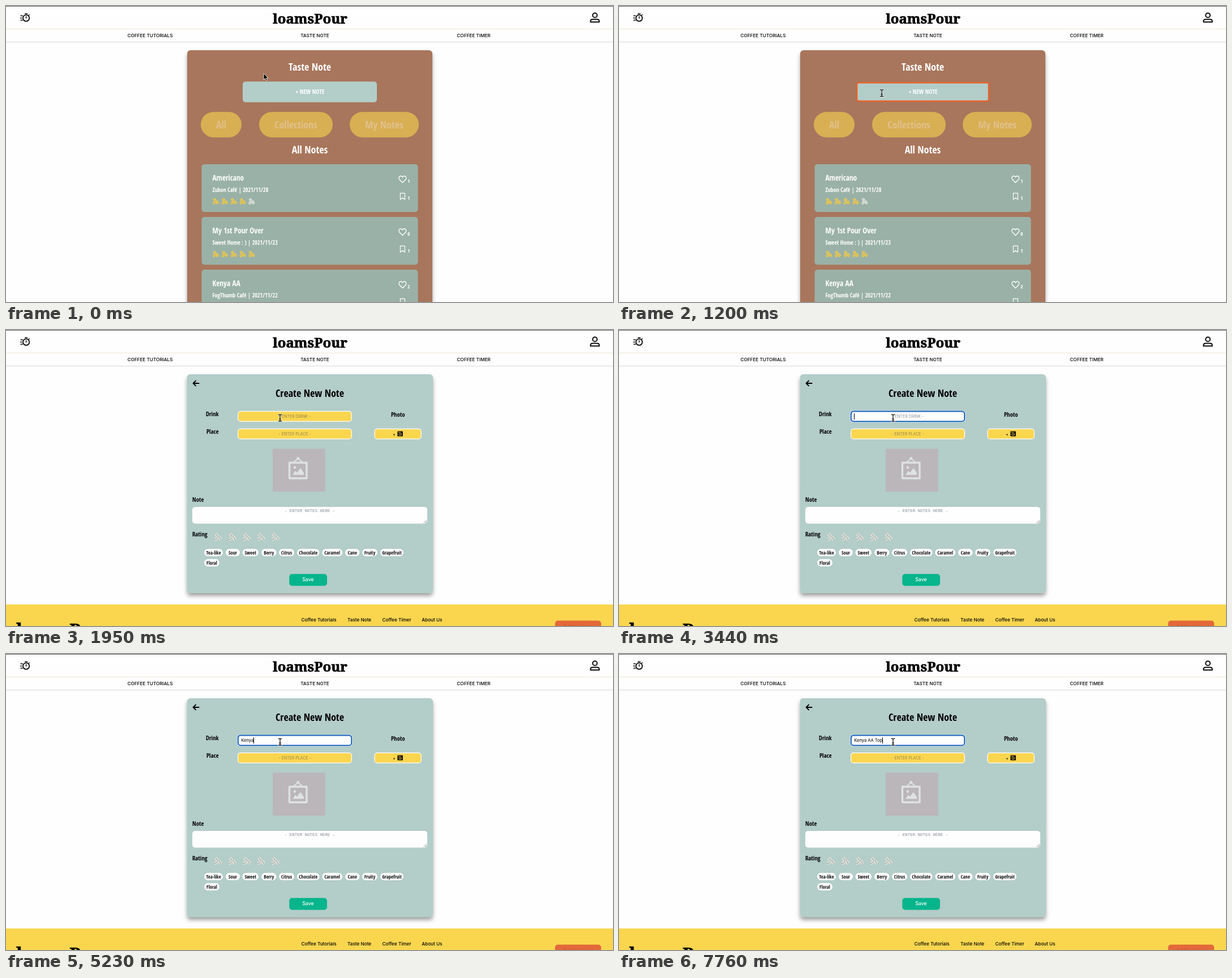
Write an HTML page that moves like this. It is 1072 px wide and 522 px high and loops after 8 s.

```html
<!DOCTYPE html>
<html lang="en">
<head>
<meta charset="utf-8">
<title>Taste notes</title>
<style>
  html, body { margin: 0; width: 100%; height: 100%; overflow: hidden; background: #fefefe; }
  svg { display: block; width: 100vw; height: 100vh; }
  text { font-family: Inter, "Open Sans", sans-serif; font-weight: 500; }
  .cond { font-family: "Open Sans Condensed", "Open Sans", sans-serif; font-stretch: 75%; font-weight: 700; }
  .light { font-weight: 300; }
  .logo { font-family: "Noto Serif", serif; font-weight: 700; stroke: #000; stroke-width: .7px; }
  .mono { font-family: "Liberation Mono", monospace; font-weight: 400; }
  .hint { font-size: 7px; font-weight: 400; }
  .mid { text-anchor: middle; }
  .line { fill: none; stroke-linecap: round; stroke-linejoin: round; }
</style>
</head>
<body>
<svg viewBox="0 0 1072 522" preserveAspectRatio="none">
  <defs>
    <filter id="shadow" x="-10%" y="-10%" width="120%" height="125%">
      <feDropShadow dx="0" dy="5" stdDeviation="3.5" flood-color="#000" flood-opacity=".36"/>
    </filter>
    <g id="beans">
      <ellipse cx="-1.8" cy="-2.6" rx="2.4" ry="3.3" transform="rotate(-38 -1.8 -2.6)"/>
      <ellipse cx="-2.9" cy="2.8" rx="2.2" ry="3" transform="rotate(55 -2.9 2.8)"/>
      <ellipse cx="2.6" cy="1.7" rx="2.5" ry="3.6" transform="rotate(-30 2.6 1.7)"/>
      <path class="line" d="M-3.6-4.8Q-1.4-3.4-.6-.6M-5.4 3.8Q-3.2 3.6-.8 1.6M.9-1Q3 1.4 4.2 4.4" stroke="#8b9a83" stroke-width=".8"/>
    </g>
    <path id="heart" class="line" stroke="#fff" stroke-width="1.4" d="M0 6L-5.4.6C-7.8-2-6-5.8-3.2-5.8Q-1-5.8 0-3.6Q1-5.8 3.2-5.8C6-5.8 7.8-2 5.4.6Z"/>
    <path id="bookmark" class="line" stroke="#fff" stroke-width="1.2" d="M-4-5.6H4V5.6L0 2.4L-4 5.6Z"/>
    <path id="beam" class="line" d="M-2.8-5.8Q0-5.8 0-4.4Q0-5.8 2.8-5.8M0-4.4V4.6M-1.6 2H1.6M-2.8 6Q0 6 0 4.6Q0 6 2.8 6"/>
  </defs>

  <rect width="1072" height="522" fill="#fefefe"/>
  <rect width="1072" height="1" fill="#626262"/>
  <rect y="40" width="1072" height="1" fill="#ece6cf"/>
  <rect y="63" width="1072" height="1" fill="#d9d9d3"/>
  <g class="line" stroke="#0b0b0b" stroke-width="1.8">
    <circle cx="35.6" cy="21.3" r="5.6"/>
    <path d="M33.6 13.6H37.6M35.6 18.5V21.5M40.2 16.2L41.2 15.2M26 17.3H29.2M25.6 21.2H27.8M26 25.1H29.2" stroke-width="1.5"/>
    <circle cx="1040" cy="16.4" r="3.9" stroke-width="2"/>
    <path d="M1032.3 28.3V27Q1032.3 23.6 1036.5 23.6H1043.5Q1047.7 23.6 1047.7 27V28.3Z" stroke-width="2"/>
  </g>
  <text class="logo mid" x="537" y="31" font-size="24">loamsPour</text>
  <g class="mid" font-size="8.2">
    <text x="254.5" y="55">COFFEE TUTORIALS</text>
    <text x="545.5" y="55">TASTE NOTE</text>
    <text x="826" y="55">COFFEE TIMER</text>
  </g>

  <g id="list">
    <rect x="320" y="78" width="433" height="480" rx="6" fill="#a8765b" filter="url(#shadow)"/>
    <g class="mid" font-size="18" fill="#fff">
      <text class="cond" x="536.5" y="114.3">Taste Note</text>
      <text class="cond" x="536.5" y="259.5">All Notes</text>
    </g>
    <rect id="newNote" fill="#b3cdc9" stroke="#e8622a"/>
    <text class="cond mid" x="537" y="154.8" font-size="10.5" fill="#fff">+ NEW NOTE</text>
    <g id="tabs"></g>
    <g id="notes"></g>
  </g>

  <g id="form">
    <rect x="319.5" y="78" width="434.5" height="386" rx="6" fill="#b3cdc9" filter="url(#shadow)"/>
    <path class="line" d="M340.5 94H331M335 89.6L330.6 94L335 98.4" stroke="#000" stroke-width="2"/>
    <text class="cond mid" x="536.5" y="118.3" font-size="18">Create New Note</text>
    <g font-size="10.7">
      <text class="cond" x="353" y="152">Drink</text>
      <text class="cond" x="354" y="183">Place</text>
      <text class="cond" x="680" y="152.5">Photo</text>
      <text class="cond" x="329" y="302.5">Note</text>
      <text class="cond" x="329" y="364">Rating</text>
    </g>
    <rect id="ring" x="408" y="142" width="204" height="21" rx="6" fill="#e8f0f2"/>
    <rect id="drinkBox" x="409.8" y="143.4" width="200.4" height="17.8" rx="4.5"/>
    <g fill="#fad64f" stroke="#fff" stroke-width="1.2">
      <rect x="409.6" y="174.4" width="200.8" height="17.8" rx="4.5"/>
      <rect x="651" y="174.4" width="82.2" height="17.8" rx="4.5"/>
    </g>
    <text id="drinkHint" class="hint mid" x="510" y="155">- ENTER DRINK -</text>
    <text class="hint mid" x="510" y="185.7" fill="#96844a">- ENTER PLACE -</text>
    <text id="drink" x="415.3" y="155" font-size="7.5" style="font-weight:400"></text>
    <rect id="caret" y="147" width="1" height="11"/>
    <text x="683" y="186.5" font-size="7">+</text>
    <rect x="691.3" y="178.6" width="9.6" height="8.8" rx="1.2" fill="#161206"/>
    <path d="M692.5 180.4H697" stroke="#fad64f" stroke-width=".7"/>
    <circle class="line" cx="696" cy="184" r="2" stroke="#fad64f" stroke-width=".8"/>

    <rect x="471" y="209.5" width="92.5" height="75.5" fill="#bab6b9"/>
    <g class="line" stroke="#dfe2e2">
      <rect x="500.5" y="234" width="30.5" height="27.5" stroke-width="3.4"/>
      <path d="M509 232L515.7 227L522.5 232" stroke-width="2"/>
    </g>
    <g fill="#dfe2e2">
      <circle cx="515.7" cy="226.3" r="2.5"/>
      <circle cx="510" cy="242.5" r="2.3"/>
      <path d="M506 255.5L511 248.5L514 251.5L520 243.5L526 252V255.5Z"/>
    </g>

    <rect x="329" y="312" width="415" height="29.5" rx="5" fill="#fefefe"/>
    <text class="mono mid" x="536.5" y="320.8" font-size="7.45" fill="#858b99">- ENTER NOTES HERE -</text>
    <path d="M737.5 340.5L743 335M740.5 340.5L743 338" stroke="#777" stroke-width=".8"/>
    <g id="rating" fill="#dcdfdb"></g>
    <g id="chips" font-size="8.6" fill="#111"></g>
    <rect x="500.3" y="430.2" width="66.7" height="21" rx="5" fill="#06b58c"/>
    <text class="mid" x="533.5" y="443.3" font-size="8.8" fill="#fff">Save</text>

    <rect y="484" width="1072" height="38" fill="#fad64f"/>
    <text class="logo" x="18" y="540" font-size="31">loamsPour</text>
    <g font-size="8.2">
      <text x="521.5" y="514">Coffee Tutorials</text>
      <text x="603" y="514">Taste Note</text>
      <text x="664.5" y="514">Coffee Timer</text>
      <text x="734.3" y="514">About Us</text>
    </g>
    <rect x="969.7" y="512.5" width="81.3" height="24" rx="5" fill="#e3683a"/>
    <text class="mid" x="1010.5" y="525.5" font-size="8.5" fill="#d4512a">Add to Home</text>
  </g>

  <g id="cursor">
    <path data-shape="arrow" d="M0 0V11L2.6 8.7L4.4 12.6L6.3 11.7L4.6 8H8Z" fill="#000" stroke="#fff" stroke-width=".8"/>
    <path data-shape="hand" d="M-2-5Q-1-6.2 0-5V-1L4-.2Q5.2.2 5 2L4 6.5H-2L-5 2Q-5 .4-3.6 1L-2 2.4Z" fill="#fff" stroke="#000" stroke-width=".9"/>
    <g data-shape="beam">
      <use href="#beam" stroke="#fff" stroke-opacity=".8" stroke-width="2.6"/>
      <use href="#beam" stroke="#000" stroke-width="1.2"/>
    </g>
  </g>
</svg>

<script>
const $ = id => document.getElementById(id);
const show = (el, on) => { el.style.display = on ? '' : 'none'; };
const setAttrs = (el, attrs) => Object.entries(attrs).forEach(([k, v]) => el.setAttribute(k, v));
const text = (cls, x, y, str, extra = '') => `<text class="${cls}" x="${x}" y="${y}" ${extra}>${str}</text>`;
const icon = (id, x, y, extra = '') => `<use href="#${id}" x="${x}" y="${y}" ${extra}/>`;
const five = draw => [0, 1, 2, 3, 4].map(draw).join('');

$('tabs').innerHTML = [['All', 344, 72], ['Collections', 447, 130], ['My Notes', 607, 122]]
  .map(([label, x, w]) =>
    `<rect x="${x}" y="186.7" width="${w}" height="45" rx="22.5" fill="#d8af53"/>` +
    text('cond mid', x + w / 2, 215.8, label, 'font-size="18" fill="#e0c08c"'))
  .join('');

$('notes').innerHTML = [
  ['Americano', 'Zubon Café | 2021/11/28', 4, 1, 1],
  ['My 1st Pour Over', 'Sweet Home : ) | 2021/11/23', 5, 0, 1],
  ['Kenya AA', 'FogThumb Café | 2021/11/22', 4, 2, 1],
].map(([name, info, stars, likes, saves], i) => {
  const y = 279 + i * 93;
  return `<g fill="#fff"><rect x="345.5" y="${y}" width="382" height="84.3" rx="5" fill="#9ab1a7"/>` +
    text('cond', 364.5, y + 28.8, name, 'font-size="13.3"') +
    text('cond', 364.5, y + 49, info, 'font-size="10"') +
    five(n => icon('beans', 370.5 + n * 15.8, y + 65.5, `fill="${n < stars ? '#f3cd4e' : '#e6e8e4'}"`)) +
    icon('heart', 700.3, y + 26.5) + icon('bookmark', 700.4, y + 56.8) +
    text('cond light', 709, y + 33, likes, 'font-size="9.5"') +
    text('cond light', 709, y + 63, saves, 'font-size="9.5"') + '</g>';
}).join('');

$('rating').innerHTML = five(n =>
  `<g transform="translate(${374.3 + n * 25.4} 365) scale(1.25)"><use href="#beans"/></g>`);

$('chips').innerHTML = [
  ['Tea-like', 350, 33], ['Sour', 388, 25], ['Sweet', 417.5, 28.5], ['Berry', 451, 26.5],
  ['Citrus', 482, 27], ['Chocolate', 514, 39.5], ['Caramel', 558.3, 35.7], ['Cane', 599, 25.5],
  ['Fruity', 629, 27], ['Grapefruit', 661, 41], ['Floral', 350, 27, 18],
].map(([label, x, w, dy = 0]) =>
  `<rect x="${x}" y="${386 + dy}" width="${w}" height="13" rx="6.5" fill="#fefefe"/>` +
  text('cond light mid', x + w / 2, 395.6 + dy, label)).join('');

const LOOP = 8000, FORM_AT = 1350, FOCUS_AT = 2390;
const DRINK = 'Kenya\u00a0AA\u00a0Top';
const keyTimes = [3590, 3890, 4180, 4930, 5230, 5680, 5980, 6270, 6870, 7160, 7460, 7760];
const caretFlips = [FOCUS_AT, 2840, 3440, 4630, 4930, 6720, 6870];
const cursorSteps = [
  [0, 'arrow', 455, 119], [150, 'arrow', 460, 136], [300, 'hand', 464, 149], [450, 'hand', 464, 153],
  [1200, 'beam', 464, 153.5], [1650, 'beam', 471, 154], [1800, 'beam', 480, 155], [1950, 'beam', 484, 155],
];
const passed = (times, t) => times.filter(at => at <= t).length;

function render(t) {
  const inForm = t >= FORM_AT, focused = t >= FOCUS_AT;
  show($('list'), !inForm);
  show($('form'), inForm);

  const hover = passed([300, 450], t) / 2, inset = 2 * hover;
  setAttrs($('newNote'), {
    x: 418 + inset, y: 133.3 + inset, width: 237 - 2 * inset, height: 36.5 - 2 * inset,
    rx: 5 - inset, 'stroke-width': 2.6 * hover,
  });

  const typed = passed(keyTimes, t);
  show($('ring'), focused);
  setAttrs($('drinkBox'), focused
    ? { fill: '#fefefe', stroke: '#1560bd', 'stroke-width': 2 }
    : { fill: '#fad64f', stroke: '#fff', 'stroke-width': 1.2 });
  $('drinkHint').setAttribute('fill', focused ? '#8b919b' : '#96844a');
  show($('drinkHint'), !typed);
  $('drink').textContent = DRINK.slice(0, typed);
  show($('caret'), passed(caretFlips, t) % 2);
  $('caret').setAttribute('x', Math.round(415 + (typed ? $('drink').getComputedTextLength() : 0)));

  const [, shape, x, y] = cursorSteps[passed(cursorSteps.map(s => s[0]), t) - 1];
  $('cursor').setAttribute('transform', `translate(${x} ${y})`);
  for (const el of $('cursor').children) show(el, el.dataset.shape === shape);
}

const start = performance.now();
function tick() {
  render((performance.now() - start) % LOOP);
  requestAnimationFrame(tick);
}
tick();
</script>
</body>
</html>
```
